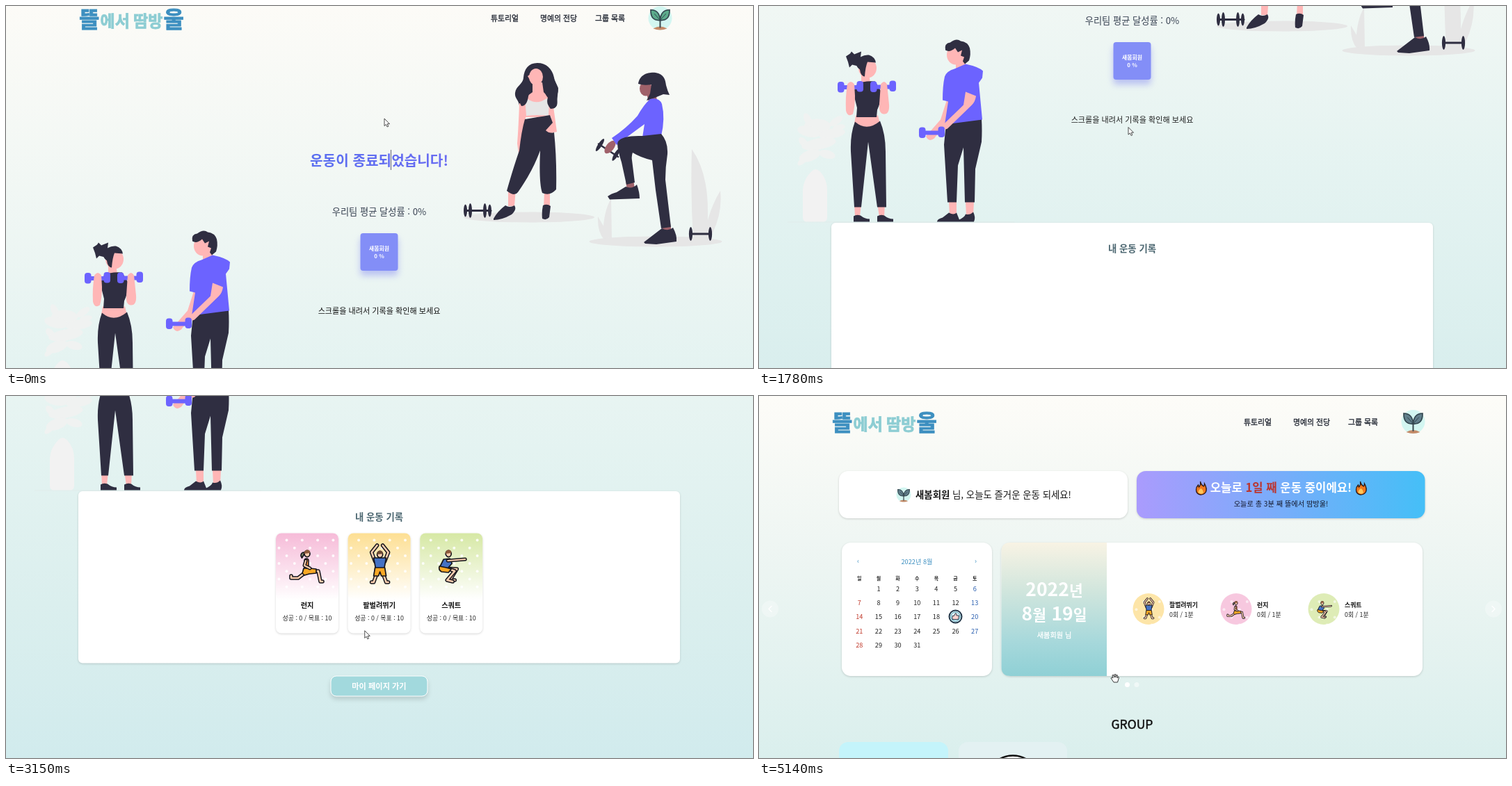
An HTML page that plays this animation: 1074 px wide and 521 px high, repeating every 5.21 s.

```html
<!DOCTYPE html>
<html lang="ko">
<head>
<meta charset="utf-8">
<title>운동 기록</title>
<style>
html, body { margin: 0; width: 100%; height: 100%; overflow: hidden; }
svg { display: block; width: 100vw; height: 100vh; font-family: "Noto Sans CJK KR", "Noto Sans CJK", "Noto Sans", sans-serif; }
.soft { filter: drop-shadow(0 1.5px 1.5px rgba(0, 0, 0, .16)); }
.lift { filter: drop-shadow(0 4px 3px rgba(0, 0, 0, .14)); }
.glow { filter: drop-shadow(0 7px 5px rgba(99, 102, 241, .36)); }
</style>
</head>
<body>
<svg id="stage" viewBox="0 0 1074 521" xmlns="http://www.w3.org/2000/svg"></svg>
<script>
const LOOP = 5210, SWITCH = 4170;
const DARK = '#2f2e41', SKIN = '#ffb6b6', PURPLE = '#6c63ff', BROWN = '#a0616a', GREY = '#e6e6e6';
const USER = '새봄회원';

// --- drawing helpers ---
const path = (d, fill, more = '') => `<path d="${d}" fill="${fill}" ${more}/>`;
const line = (d, stroke, width) => path(d, 'none', `stroke="${stroke}" stroke-width="${width}" stroke-linecap="round" stroke-linejoin="round"`);
const oval = (x, y, rx, ry, fill, turn = 0, more = '') =>
  `<ellipse cx="${x}" cy="${y}" rx="${rx}" ry="${ry}" fill="${fill}" transform="rotate(${turn} ${x} ${y})" ${more}/>`;
const rect = (x, y, w, h, r, fill, more = '') =>
  `<rect x="${x}" y="${y}" width="${w}" height="${h}" rx="${r}" fill="${fill}" ${more}/>`;
// A thin outline gives the medium weight where only regular and bold exist.
const text = (x, y, size, str, fill, weight = 400, anchor = 'middle') =>
  `<text x="${x}" y="${y}" font-size="${size}" fill="${fill}" font-weight="${weight}" text-anchor="${anchor}"`
  + `${weight === 500 ? ` stroke="${fill}" stroke-width="${size * .025}"` : ''}>${str}</text>`;
const group = (body, more = '') => `<g ${more}>${body}</g>`;
const move = (x, y, body, scale = 1) => group(body, `transform="translate(${x} ${y}) scale(${scale})"`);
const gradient = (id, stops, more = 'x2="0" y2="1"') =>
  `<linearGradient id="${id}" ${more}>${stops.map(([at, color, alpha = 1]) =>
    `<stop offset="${at}" stop-color="${color}" stop-opacity="${alpha}"/>`).join('')}</linearGradient>`;

// --- people ---
function standingWoman() {
  return oval(752, 304, 94, 7.5, GREY)
    + path('M764 82C751 82 745 91 744 103C744 112 733 115 732 125C731 133 737 135 738 143Q745 147 750 139L780 147Q788 150 792 143C794 136 790 133 793 126C796 117 789 111 788 103C785 90 777 82 764 82Z', DARK)
    + path('M757 110H771L773 124L783 134V160H746V132L757 124Z', SKIN)
    + oval(762, 102, 10, 12, SKIN) + path('M754 98L750 101L753 106Z', SKIN)
    + path('M738 140Q737 172 735 198L737 212Q742 214 744 206L747 165V140Z', SKIN)
    + path('M781 145H787L792 181L779 184L774 179L785 169Z', SKIN)
    + path('M746 130Q751 130 750 134Q764 143 777 133L781 134L780 158Q764 156 748 158Z', GREY)
    + path('M773 94Q782 104 776 114Q772 124 779 132Q776 140 783 148Q792 148 792 140L794 118L783 94ZM752 108Q756 118 751 130Q749 144 741 144L733 128L744 106Z', DARK)
    + path('M722 262H733L731 288H722ZM774 268H782V290H773Z', SKIN)
    + path('M746 163Q764 160 782 157L786 168L776 179Q781 184 788 182Q792 220 791 264Q782 274 771 269Q766 255 768 208Q757 238 736 268Q731 275 720 266Q729 234 738 208Q741 180 746 163Z', DARK)
    + path('M701 306Q707 295 718 287Q724 291 731 287Q735 293 727 300Q713 308 701 308ZM772 287Q778 284 783 288L781 304Q777 309 771 306Q770 297 772 287Z', DARK)
    + line('M660 294.5H697', DARK, 3)
    + [660.5, 667.5, 688.5, 695.5].map((x, i) => oval(x, 294.5, 2.5, i % 3 ? 10.5 : 9, DARK)).join('');
}

function steppingWoman() {
  return path('M986 206Q1010 240 1009 300V336H988Q984 270 986 206ZM1027 266Q1031 302 1010 338L1005 325Q1012 290 1027 266ZM870 277Q857 300 859 335H871ZM851 303Q850 325 860 336H870Q860 318 851 303Z', GREY)
    + oval(934, 339, 95.5, 7.5, GREY)
    + oval(920, 119, 9, 10.5, BROWN) + path('M920 122L934 120L936 138L924 138Z', BROWN)
    + path('M909 112C911 98 924 95 934 96C946 98 948 106 949 114Q951 122 954 128L945 127Q934 132 921 136L926 126L928 113Q917 115 909 112Z', DARK)
    + line('M852 198.5L880 217', DARK, 2.6)
    + oval(854, 200, 2.8, 10.5, DARK, 33) + oval(877, 214, 2.8, 10, DARK, 30)
    + oval(868.5, 203, 5.6, 11, BROWN, 38)
    + path('M891 252L902 250L904 263L893 265ZM943 314L955 313L957 325L944 325Z', BROWN)
    + path('M926 134Q939 131 943 141Q948 162 942 187L915 189L918 170Q900 183 878 200L871 190Q892 176 908 158Q917 142 926 134Z', PURPLE)
    + path('M915 187L942 184Q952 195 951 213Q948 232 948 250L956 318L942 320L934 265L929 222Q912 218 901 211Q899 216 900 222L904 254L892 257L885 225Q877 200 880 195Q886 186 915 187Z', DARK)
    + path('M865 274Q870 270 878 268L891 260Q900 264 907 257Q911 268 911 277L868 278.5ZM917 340L930 330L943 320Q952 325 959 319Q965 330 964 339L935 343L919 342Z', DARK)
    + line('M984 328H1013', DARK, 3) + oval(984.5, 328, 2.6, 10, DARK) + oval(1012.5, 328, 2.6, 10, DARK);
}

const weight = (x, y) => rect(x, y + 5, 36, 6, 2, PURPLE) + rect(x, y, 9.5, 15.5, 4, PURPLE) + rect(x + 27.5, y - 1, 9.5, 15.5, 4, PURPLE);

function plant() {
  const leaves = [[70, 284, 5, 10, -25], [84, 293, 19, 10, 0], [111, 286, 11, 5, -35], [72, 301, 17, 8, 12], [105, 304, 19, 7, -8],
    [64, 317, 9, 5, 50], [86, 319, 25, 8, -10], [73, 336, 16, 8, -20], [98, 334, 12, 6, 15], [62, 344, 8, 4, -40], [115, 295, 9, 4, -10]];
  return leaves.map(([x, y, rx, ry, turn]) => oval(x, y, rx, ry, '#f0f2f1', turn)).join('')
    + path('M75 359Q81 352 88 359Q98 370 98 385V425Q98 431 92 431H69Q63 431 63 425V385Q64 370 75 359Z', '#f2f2f2');
}

function curlingWoman() {
  return path('M125 193L131 189L133 186L137 190L147 186L146 194L149 198L142 207L134 205L130 209L128 201Z', DARK)
    + path('M147 216H158L160 232H147Z', SKIN) + oval(156, 210, 13, 14, SKIN)
    + path('M140 201Q146 190 158 191Q167 194 168 202L156 201Q153 208 152 222Q146 221 145 212Q139 208 140 201Z', DARK)
    + path('M137 404H147L145 424H138ZM170 404H181L180 424H173Z', SKIN)
    + path('M139 278H171L174 290Q156 300 137 290Z', SKIN)
    + path('M149 230Q158 228 167 229L176 244Q175 260 170 270L169 280.5H140L141 267L135 243L143 230Z', DARK)
    + path('M138 287Q155 302 174 286Q182 305 182 330L183 410H170L157 316L147 410H137L132 330Q131 305 138 287Z', DARK)
    + path('M136 431V423Q140 420 146 422Q152 427 159 427V431ZM170 431V423Q175 420 180 422Q186 427 193 427V431Z', DARK)
    + weight(113, 229.5) + weight(160, 229)
    + path('M127 233Q132 226 137 233L138 250Q138 266 135 276Q127 281 125 271Q124 252 127 233ZM175 233Q180 226 184 233L187 262Q188 277 179 276Q172 275 173 262Z', SKIN);
}

function man() {
  return path('M283 198H296L299 214L283 217Z', SKIN) + oval(283, 191, 13, 14, SKIN)
    + path('M268 184Q266 174 275 173Q284 166 290 171Q300 172 303 181Q305 190 302 199L296 204L293 200L295 194L290 192L292 184L286 187L282 181Q274 188 268 184Z', DARK)
    + path('M273 402H284V422H274ZM297 402H309L308 422H298Z', SKIN)
    + path('M269 289L320 283Q321 300 320 316L311 355L310 403H296L294 324L286 350L284 403H271L266 320Z', DARK)
    + path('M256 431Q256 427 264 425L273 418Q280 422 284 418L288 428Q296 424 297 420Q303 422 308 417Q312 425 309 431Z', DARK)
    + path('M270 256L280 254L279 276L252 311Q244 317 240 308L261 284Z', SKIN)
    + path('M281 211L297 204Q316 208 322 214L321 224L316 231L321 284L267 291L272 258L264 256Q264 235 267 222Q270 214 281 211Z', PURPLE)
    + path('M297 244L312 250Q311 258 306 263L271 297Q264 300 263 293L294 263Z', SKIN)
    + weight(230, 295);
}

// --- icons, drawn around 0,0 ---
const INK = '#15151c', PEACH = '#ffcfb0', ORANGE = '#f9a825', BLUE = '#4472c4';
const limb = (d, fill = PEACH, w = 2.6) => line(d, INK, w + 3) + line(d, fill, w);
const outlined = (d, fill) => path(d, fill, `stroke="${INK}" stroke-width="1.7" stroke-linejoin="round"`);
const headIcon = (x, y, hair) => outlined(`M${x - 4} ${y}a4 4.6 0 1 1 8 0a4 4.6 0 1 1 -8 0Z`, PEACH)
  + path(`M${x - 4.5} ${y}Q${x - 4} ${y - 6} ${x + 1} ${y - 5.6}Q${x + 4.5} ${y - 5} ${x + 4} ${y - 1}Z`, hair);
const ICONS = {
  lunge: outlined('M-4 -20Q-9 -20 -9 -15L-7.5 -12L-5 -16Z', '#7d8a6a')
    + limb('M-4 10L-13 17H-23V14') + limb('M4 7L16 7L19 22H22')
    + limb('M-1 -8L-1 3', '#ef8b3c', 4.5) + outlined('M-5 3H4L13 4V10L3 11L-4 13L-7 10Z', ORANGE)
    + limb('M-2 -8L-4 -1L4 3', PEACH, 2) + headIcon(0, -18, '#8c5a3c'),
  jack: limb('M-6 -7L-11 -20L-3 -30') + limb('M8 -7L13 -20L5 -30')
    + limb('M-4 12L-8 23H-11') + limb('M6 12L10 23H13')
    + outlined('M-8 -12H10L7 4H-5Z', BLUE) + outlined('M-6 2H8L10 14H3L1 8L-1 14H-8Z', ORANGE) + headIcon(1, -17, '#6b4a35'),
  squat: limb('M-11 3L8 4L-2 20H5') + limb('M-6 3L5 7L-6 20L2 22')
    + outlined('M-11 -10L-2 -11L1 -4L-6 4L-17 2Z', BLUE) + outlined('M-17 0L-7 2L0 4L-4 9L-14 8Q-19 5 -17 0Z', ORANGE)
    + limb('M-5 -8L20 -10', PEACH, 2) + headIcon(-4, -18, '#8c5a3c')
};
const EXERCISES = [['lunge', '런지', '#f6bbd8'], ['jack', '팔벌려뛰기', '#fddf93'], ['squat', '스쿼트', '#d6e8a4']];

const sprout = leaf => oval(0, 0, 17, 17, '#d3f6f1') + path('M-10 15Q0 9 10 15Q0 19 -10 15Z', '#c48a68')
  + line('M0 13V0', '#3c4a50', 2)
  + path('M0 3Q-14 4 -13.5 -12Q-1 -12 0 3ZM0 3Q1 -12 13.5 -12Q14 4 0 3Z', leaf, 'stroke="#33464f" stroke-width="1.7"')
  + line('M0 3L-8 -6M0 3L8 -6', '#33464f', 1);

function dots(x, y, w, rows) {
  let out = '';
  for (let r = 0; r < rows; r++)
    for (let dx = r % 2 ? 4.5 : 15.5; dx < w; dx += 22.3)
      out += `<circle cx="${x + dx}" cy="${y + 10 + r * 11.2}" r="2" fill="#fff" opacity=".85"/>`;
  return out;
}

// --- shared header, laid out for the unscrolled page ---
const wordmark = (x, y, size, str, color) =>
  `<text x="${x}" y="${y}" font-size="${size}" font-weight="900" fill="${color}" stroke="${color}" stroke-width=".8">${str}</text>`;
function header(leaf) {
  const strong = '#3d8fc0', pale = '#8dcdd3';
  return wordmark(105, 50, 32, '뜰', strong) + wordmark(135.5, 49, 23, '에서', pale)
    + wordmark(183, 49, 23, '땀방', pale) + wordmark(226.5, 50, 32, '울', strong)
    + text(717, 41.5, 10.9, '튜토리얼', '#1f2430', 500) + text(794.5, 41.5, 10.9, '명예의 전당', '#1f2430', 500)
    + text(868.5, 41.5, 10.9, '그룹 목록', '#1f2430', 500) + move(940.5, 37, sprout(leaf));
}

// --- page with the workout result ---
function recordCard([icon, name, color], i) {
  const x = 388 + i * 103.6, mid = x + 45;
  return rect(x, 647.5, 90, 144, 8, '#fff', 'class="soft"') + rect(x, 647.5, 90, 96, 8, `url(#fade-${icon})`)
    + dots(x, 647.5, 90, 7) + move(mid, 695, ICONS[icon])
    + text(mid, 754.5, 10.2, name, '#111', 700) + text(mid, 773, 8.9, '성공 : 0 / 목표 : 10', '#222');
}
function resultPage() {
  return rect(0, 0, 1074, 972, 0, 'url(#sky)') + move(0, -19.5, header('#5cab8c'))
    + standingWoman() + steppingWoman()
    + move(0, 154.5, line('M41 431.5H367', '#dfe7e6', .6) + plant() + curlingWoman() + man())
    + text(536.5, 230, 20.2, '운동이 종료되었습니다!', 'url(#title)', 700)
    + '<rect id="caret" x="553" y="207" width="1" height="29" fill="#667"/>'
    + text(536.5, 300.5, 13.25, '우리팀 평균 달성률 : 0%', '#374151')
    + rect(509.5, 327, 54, 54, 4, '#838ef7', 'class="glow"')
    + text(536.5, 351.5, 7.9, USER, '#fff', 700) + text(536.5, 363, 7.9, '0 %', '#fff', 700)
    + group(text(536.5, 442.5, 11.1, '스크롤을 내려서 기록을 확인해 보세요', '#111'), 'id="hint"')
    + rect(104, 587, 865, 247.5, 6, '#fff', 'class="soft"')
    + text(536.5, 628.5, 13.4, '내 운동 기록', '#4b6670', 700)
    + group(EXERCISES.map(recordCard).join(''), 'id="records"')
    + rect(467, 853, 139, 29, 8, '#a2d9dd', 'stroke="#fff" class="lift"')
    + text(536.5, 872, 11.2, '마이 페이지 가기', '#fff', 700);
}
const statusBar = rect(-4, 511, 360, 14, 2, '#dbdfe5', 'stroke="#b9c0c7" stroke-width=".8"')
  + text(-2.5, 519.3, 7.1, 'flowbite.com의 응답을 기다리는 중...', '#555b62', 400, 'start');

// --- dashboard ---
function calendar() {
  const column = i => 144.3 + i * 27.65, tone = (i, plain) => i === 0 ? '#c0392b' : i === 6 ? '#2a5fb0' : plain;
  let out = rect(119, 211, 216, 192, 13, '#fff', 'class="soft"') + text(227, 241.5, 9.2, '2022년 8월', '#3d8fc0')
    + text(142.5, 241, 10, '‹', '#3d8fc0') + text(311.5, 241, 10, '›', '#3d8fc0');
  [...'일월화수목금토'].forEach((day, i) => out += text(column(i), 264.5, 7, day, '#222', 700));
  for (let day = 1; day <= 31; day++)
    if (day !== 19) out += text(column(day % 7), 281 + Math.floor(day / 7) * 20.2, 9.2, day, tone(day % 7, '#222'));
  return out + `<circle cx="282.5" cy="317.5" r="9" fill="#dff1f5" stroke="#24384a" stroke-width="2"/>`
    + `<circle cx="282.5" cy="317.5" r="6.6" fill="none" stroke="#4aa0b8" stroke-width="1"/>`
    + path('M278 316.5H280.5L282.5 312.5Q284.5 312.5 284 316H287.5L286.5 321.5H278Z', '#ffd3cf', 'stroke="#24384a" stroke-width="1"');
}
const flame = x => move(x, 132, path('M-1 -9Q0 -4 4 -2Q5 -4 5 -6Q9 1 7 6Q4 10.5 -1 10Q-7 9 -7 3Q-7 -1 -4 -4L-3 -1Q0 -4 -1 -9Z', '#f0791f', 'stroke="#2a1713" stroke-width="1.3"')
  + path('M0 1Q4 4 3 8Q-1 10 -4 7Q-4 3 0 1Z', '#ffc857'));
function exerciseItem([icon, name, color], x) {
  return `<circle cx="${x}" cy="306.5" r="22.5" fill="${color}" opacity=".8"/>`
    + group(dots(x - 22, 286, 45, 4), 'opacity=".7"') + move(x, 307.5, ICONS[icon], .53)
    + text(x + 30, 304, 8.9, name, '#111', 700, 'start') + text(x + 30, 318, 8.9, '0회 / 1분', '#222', 400, 'start');
}
const small = (str, size) => `<tspan font-size="${size}">${str}</tspan>`;
function dashboard() {
  const [lunge, jack, squat] = EXERCISES;
  const arrow = (x, d) => `<circle cx="${x}" cy="306.5" r="12" fill="#fff" opacity=".3"/>` + line(`M${x - d} 302.5L${x + d} 306.5L${x - d} 310.5`, '#fff', 1.4);
  return rect(0, 0, 1074, 521, 0, 'url(#mist)') + header('#62808c')
    + rect(115, 108, 415, 68, 13, '#fff', 'class="soft"') + move(208, 142, sprout('#62808c'), .62)
    + text(225, 147, 13.4, `<tspan font-weight="700">${USER}</tspan> 님, 오늘도 즐거운 운동 되세요!`, '#151515', 400, 'start')
    + rect(543, 108, 414.5, 68, 13, 'url(#banner)', 'class="soft"') + flame(635.5) + flame(865.5)
    + text(750.5, 138, 16.7, '오늘로 <tspan fill="#bb352f">1일 째</tspan> 운동 중이에요!', '#fff', 700)
    + text(750.5, 158.5, 10.2, '오늘로 총 3분 째 뜰에서 땀방울!', '#14182a')
    + calendar()
    + rect(348.5, 211, 605.5, 192, 13, '#fff', 'class="soft"')
    + path('M500 211V403H361.5Q348.5 403 348.5 390V224Q348.5 211 361.5 211Z', 'url(#date)')
    + text(424.5, 288, 26.5, '2022' + small('년', 21.5), '#fff', 700)
    + text(424.5, 322.5, 26.5, `8${small('월', 21.5)} 19${small('일', 21.5)}`, '#fff', 700)
    + text(424.5, 348, 10.2, USER + ' 님', '#fff', 500)
    + exerciseItem(jack, 560) + exerciseItem(lunge, 686) + exerciseItem(squat, 812)
    + arrow(16, -2) + arrow(1056, 2)
    + '<circle cx="529.5" cy="415.5" r="3.5" fill="#fff"/><circle cx="543" cy="415.5" r="3.5" fill="#fff" opacity=".5"/>'
    + text(536.5, 478.5, 17.5, 'GROUP', '#111', 500)
    + rect(115, 498, 157, 60, 13, '#c4f4fb') + rect(287, 498, 156, 60, 13, '#e3f1f2')
    + '<circle cx="365" cy="556" r="38.5" fill="#fff" stroke="#111" stroke-width="2.5"/>';
}

const CURSORS = {
  arrow: path('M0 0V10.6L2.4 8.4L4.1 12L5.8 11.2L4.2 7.7H7.5Z', '#fff', 'stroke="#222" stroke-width=".8"'),
  beam: line('M-2 -5H2M0 -5V5M-2 5H2', '#444', .9),
  hand: path('M-2 6L-6 0Q-5 -2 -3 0L-4 -4Q-3 -5.5 -2 -4L-1 -1L-1 -5Q0 -6.5 1 -5V-1L2 -4.5Q3.5 -5 3.5 -3L3 0L4.5 -2Q6 -2 5 1L3.5 6Z', '#fff', 'stroke="#222" stroke-width=".9"')
};

const stage = document.getElementById('stage');
stage.innerHTML = '<defs>'
  + gradient('sky', [[0, '#fcfbf7'], [.27, '#f1f7f4'], [.54, '#e4f3f1'], [.77, '#dbefee'], [1, '#d1ebed']])
  + gradient('mist', [[0, '#fdfcf8'], [.4, '#eff6f3'], [1, '#daefed']])
  + gradient('title', [[0, '#5a6ff0'], [1, '#6a6cf2']], '')
  + gradient('date', [[0, '#f8f3e4'], [.35, '#d2e6dd'], [.75, '#a6d8db'], [1, '#8fd0d5']])
  + gradient('banner', [[0, '#aa9bfd'], [1, '#45bff7']], 'gradientUnits="userSpaceOnUse" x1="543" x2="957" y1="0" y2="0"')
  + EXERCISES.map(([icon, , color]) => gradient('fade-' + icon, [[0, color], [1, color, 0]])).join('')
  + '</defs>'
  + group(resultPage(), 'id="result"') + group(statusBar, 'id="status"') + group(dashboard(), 'id="dashboard"')
  + group(Object.entries(CURSORS).map(([name, art]) => group(art, `id="${name}"`)).join(''), 'id="cursor"');
const el = Object.fromEntries([...stage.querySelectorAll('[id]')].map(node => [node.id, node]));

// --- motion ---
// [start, count]: the picture is refreshed count times, 70 ms apart.
const RUNS = [[0, 1], [70, 1], [390, 1], [530, 1], [670, 1], [810, 1], [950, 1], [1430, 8], [1980, 5],
  [2730, 8], [3290, 5], [3830, 1], [4030, 8], [4580, 8], [5140, 1]];
const SCROLL = [[1360, 0], [1430, 10.5], [1500, 50], [1640, 154.5], [1780, 275], [1920, 382.5], [1980, 415], [2050, 437], [2120, 447], [2190, 450]];
const CURSOR_X = [[1500, 544], [1640, 534], [1920, 528], [2260, 521], [2660, 521], [3220, 515], [3500, 511], [3760, 511], [4030, 513], [4100, 513], [4170, 512]];
const CURSOR_Y = [[1500, 162], [1640, 173], [1920, 176], [2260, 182], [2660, 182], [3220, 360], [3500, 402], [3760, 402], [3830, 406]];

function refreshTime(t) {
  const [start, count] = RUNS.filter(run => run[0] <= t).pop();
  return start + 70 * Math.min(count - 1, Math.floor((t - start) / 70));
}
function along(keys, t) {
  if (t <= keys[0][0]) return keys[0][1];
  for (let i = 1; i < keys.length; i++) {
    const [t0, a] = keys[i - 1], [t1, b] = keys[i];
    if (t <= t1) return a + (b - a) * (t - t0) / (t1 - t0);
  }
  return keys[keys.length - 1][1];
}
function cursorKind(t) {
  if (t >= SWITCH || (t >= 3830 && t < 4030)) return 'hand';
  return (t >= 1640 && t < 1780) || (t >= 2190 && t < 2800) ? 'beam' : 'arrow';
}
const show = (node, on) => node.setAttribute('display', on ? 'inline' : 'none');

function update(now) {
  const t = refreshTime(now % LOOP);
  const onDashboard = t >= SWITCH;
  show(el.result, !onDashboard);
  show(el.dashboard, onDashboard);
  show(el.status, t >= 4030 && !onDashboard);
  show(el.caret, t < 70);
  el.result.setAttribute('transform', `translate(0 ${-along(SCROLL, t)})`);
  el.hint.setAttribute('opacity', .75 + .25 * Math.cos(Math.PI * t / 1000));

  const shown = 1 - (1 - Math.min(1, Math.max(0, (t - 1780) / 480))) ** 2.3;
  el.records.setAttribute('opacity', shown);
  el.records.setAttribute('transform', `translate(0 ${60 * (1 - shown)})`);

  const drift = (5140 - t) * .02;
  el.banner.setAttribute('gradientTransform', `translate(${onDashboard ? drift : 0} 0)`);

  const kind = cursorKind(t);
  for (const name in CURSORS) show(el[name], name === kind);
  el.cursor.setAttribute('transform', `translate(${along(CURSOR_X, t)} ${along(CURSOR_Y, t)})`);
}

const begin = performance.now();
function tick() {
  update(performance.now() - begin);
  requestAnimationFrame(tick);
}
update(0);
tick();
</script>
</body>
</html>
```
